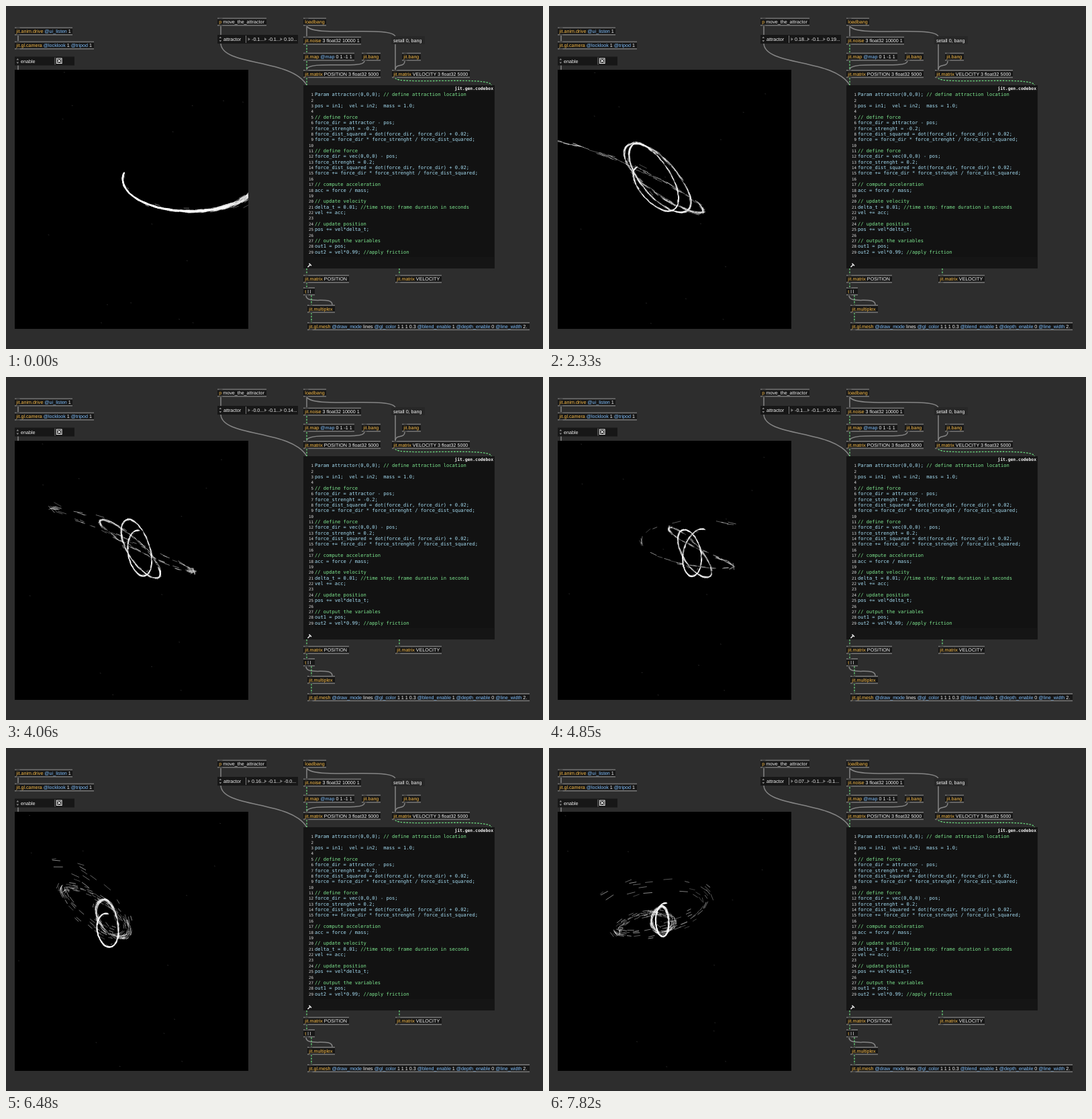
Animation, 800 px wide and 511 px high, one loop 7.85 s. Source, as an HTML page with a canvas:

```html
<!DOCTYPE html>
<html lang="en">
<head>
<meta charset="utf-8">
<title>Attractor patch</title>
<style>
html, body { margin: 0; width: 100%; height: 100%; overflow: hidden; background: #2d2d2d; }
svg, canvas { position: absolute; left: 0; top: 0; }
canvas { left: 13px; top: 95px; background: #000; }
text { white-space: pre; text-rendering: geometricPrecision; font: 7.15px "Liberation Sans", Arial, sans-serif; fill: #f4f4f4; }
.code, .num { font-family: "DejaVu Sans Mono", monospace; font-size: 7.09px; fill: #a6def4; }
.num { font-size: 5.8px; fill: #ddd; text-anchor: end; }
.head { font: bold 6.4px "DejaVu Sans Mono", monospace; text-anchor: end; }
.name { fill: #f8bb48; }
.attr { fill: #80c0ff; }
.note { fill: #7ee890; }
.cord, .wire { fill: none; stroke: #858585; stroke-width: 1.5; }
.wire { stroke: #69d67c; stroke-width: 1.3; stroke-dasharray: 2.6 1.8; }
</style>
</head>
<body>
<svg id="patch" width="800" height="511" viewBox="0 0 800 511"></svg>
<canvas id="view" width="348" height="386"></canvas>
<script>
const LOOP = 7850;
const patch = document.getElementById('patch');

function add(tag, attrs, text, parent = patch) {
  const el = document.createElementNS('http://www.w3.org/2000/svg', tag);
  for (const k in attrs) el.setAttribute(k, attrs[k]);
  if (text !== undefined) el.textContent = text;
  parent.appendChild(el);
  return el;
}
const rect = (x, y, width, height, fill) => add('rect', { x, y, width, height, fill });
const label = (x, y, text, cls = '') => add('text', { x, y, class: cls }, text);
const path = (d, cls) => add('path', { d, class: cls });
const span = (parent, text, cls) => add('tspan', { class: cls }, text, parent);

// First word is the object name, words with @ are attributes.
function box(x, y, w, text) {
  rect(x, y, w, 12, '#171717');
  for (const [dy, notch] of [[0, 0], [10.4, 11]]) {
    rect(x, y + dy, w, 1.8, '#707070');
    rect(x + 2.5, y + notch, 5, 1.2, '#3a3a3a');
  }
  const el = label(x + 2.3, y + 8.6, '');
  text.split(/(?= )/).forEach((word, i) => span(el, word, i === 0 ? 'name' : word[1] === '@' ? 'attr' : ''));
}

function attrui(x, y, w, name, split) {
  rect(x, y, w, 13, '#171717');
  add('path', { d: `M${x + 2.5} ${y + 5}l1.8 -2.4 1.8 2.4zM${x + 2.5} ${y + 8}l1.8 2.4 1.8 -2.4z`, fill: '#888' });
  label(x + 9, y + 9, name);
  rect(split, y + 1, 1, 11, '#777');
}

[
  'M18 44V53', 'M18 88V95', 'M320 29V43', 'M320 56C322 90 425 78 448 118',
  'M448 29V46', 'M448 29C452 48 578 28 580 46', 'M580 57V95',
  'M534 82C534 95 448 80 448 95', 'M594 82C594 92 580 85 580 95',
  'M447 431C447 446 486 431 486 445'
].forEach(d => path(d, 'cord'));
[
  'M448 58V70', 'M448 82V95', 'M448 107V118', 'M580 107C580 118 723 104 723 118',
  'M448 391V401', 'M586 391V401', 'M448 412V419', 'M455 431V445', 'M455 457V471'
].forEach(d => path(d, 'wire'));

box(13, 31.5, 86, 'jit.anim.drive @ui_listen 1');
box(13, 52.5, 118, 'jit.gl.camera @locklook 1 @tripod 1');
box(315, 17.5, 73, 'p move_the_attractor');
box(443, 17.5, 34, 'loadbang');
box(443, 45.5, 86, 'jit.noise 3 float32 10000 1');
box(443, 69.5, 76, 'jit.map @map 0 1 -1 1');
box(530, 69.5, 28, 'jit.bang');
box(590, 69.5, 28, 'jit.bang');
box(443, 95, 115, 'jit.matrix POSITION 3 float32 5000');
box(575, 95, 116, 'jit.matrix VELOCITY 3 float32 5000');
box(443, 400.5, 68, 'jit.matrix POSITION');
box(580, 400.5, 69, 'jit.matrix VELOCITY');
box(443, 419, 17, 't l l');
box(449, 445, 41, 'jit.multiplex');
box(449, 471, 331, 'jit.gl.mesh @draw_mode lines @gl_color 1 1 1 0.3 @blend_enable 1 @depth_enable 0 @line_width 2.');

rect(574, 45, 50, 12, '#272727');
label(577, 54, 'setall 0, bang');

attrui(13, 75.5, 89, 'enable', 72.5);
add('path', { d: 'M75.5 78h7.5v7.5h-7.5zM77 79.5l4.5 4.5M81.5 79.5l-4.5 4.5', fill: 'none', stroke: '#eee', 'stroke-width': 1.1 });
attrui(315, 43, 120, 'attractor', 357);
const readouts = [366, 390.5, 414].map(x => {
  add('path', { d: `M${x - 5.5} 47l3.5 2.5 -3.5 2.5z`, fill: '#777' });
  return label(x, 52, '');
});

rect(443, 118, 285, 273, '#151515');
rect(459, 127, 268, 247, '#121212');
label(726, 125, 'jit.gen.codebox', 'head');
add('path', { d: 'M449.5 389l4 -4M451.5 383.5l3.5 3.5', stroke: '#eee', 'stroke-width': 1.5 });
`Param attractor(0,0,0); // define attraction location

pos = in1;  vel = in2;  mass = 1.0;

// define force
force_dir = attractor - pos;
force_strenght = -0.2;
force_dist_squared = dot(force_dir, force_dir) + 0.02;
force = force_dir * force_strenght / force_dist_squared;

// define force
force_dir = vec(0,0,0) - pos;
force_strenght = 0.2;
force_dist_squared = dot(force_dir, force_dir) + 0.02;
force += force_dir * force_strenght / force_dist_squared;

// compute acceleration
acc = force / mass;

// update velocity
delta_t = 0.01; //time step: frame duration in seconds
vel += acc;

// update position
pos += vel*delta_t;

// output the variables
out1 = pos;
out2 = vel*0.99; //apply friction`.split('\n').forEach((line, i) => {
  const y = 134.3 + i * 8.37;
  const [, code, note] = line.match(/^(.*?)(\/\/.*)?$/);
  label(458, y, i + 1, 'num');
  const el = label(460, y, code, 'code');
  if (note) span(el, note, 'note');
});

// The strand winds through a chain of ellipses, one per turn, from the core outwards.
// An ellipse is given by both ends of its long axis and its half width; a negative width turns clockwise.
const poses = [
  { t: 0, x: -.13, z: .105, from: .97, to: 1.43, thin: 1, spread: 2.5, rings: [
    [174, 258, 376, 258, 48]] },
  { t: 1030, x: .045, z: .165, from: .15, to: 1.45, thin: .8, spread: 2, rings: [
    [122, 220, 238, 278, 22], [104, 196, 239, 262, 30], [104, 196, 540, 290, 60]] },
  { t: 2330, x: .185, z: .195, from: 0, to: 3, thin: 1.5, spread: 1.2, rings: [
    [131, 240, 185, 303, 22], [126, 206, 188, 303, 26], [121, 206, 222, 308, 22], [6, 201, 236, 306, 6]] },
  { t: 3330, x: -.02, z: .185, from: 0, to: 3, thin: 2, spread: 2.5, rings: [
    [167, 230, 196, 296, 18], [164, 198, 205, 296, 20], [108, 204, 228, 303, 10], [6, 152, 338, 292, 16]] },
  { t: 4850, x: -.13, z: .105, from: 0, to: 3.5, thin: 4.2, spread: 1.5, rings: [
    [232, 227, 204, 288, 15], [200, 228, 219, 305, 15], [180, 224, 258, 290, 6],
    [137, 243, 290, 275, -32], [137, 243, 450, 290, -95]] },
  { t: 6480, x: .165, z: -.03, from: 0, to: 3, thin: 3.4, spread: 16, rings: [
    [152, 247, 150, 297, 17], [147, 226, 160, 296, 13], [86, 208, 200, 264, 12], [40, 190, 150, 285, 55]] },
  { t: 7820, x: .075, z: -.12, from: 0, to: 3, thin: 3.4, spread: 16, rings: [
    [175, 231, 170, 271, 13], [168, 236, 166, 290, 9], [101, 272, 203, 240, 14], [70, 250, 270, 220, 45]] }
];

const mix = (a, b, f) => a + (b - a) * f;
const mixList = (a, b, f) => a.map((v, i) => mix(v, b[i], f));
const clamp = (v, lo, hi) => Math.min(hi, Math.max(lo, v));
const ringOf = (pose, i) => pose.rings[Math.min(i, pose.rings.length - 1)];

function strandPoint(rings, turn) {
  const i = Math.floor(turn);
  const [x0, y0, x1, y1, w] = mixList(rings[i], rings[i + 1], turn - i);
  const a = turn * 2 * Math.PI, cos = Math.cos(a);
  const hx = (x1 - x0) / 2, hy = (y1 - y0) / 2;
  const side = w * Math.sin(a) / Math.hypot(hx, hy);
  return [(x0 + x1) / 2 - hx * cos - hy * side, (y0 + y1) / 2 - hy * cos + hx * side];
}

let seed = 7;
function random() {
  seed = (seed * 16807) % 2147483647;
  return seed / 2147483647;
}
const particles = Array.from({ length: 1700 }, (_, i) => ({
  u: random(),
  off: (random() + random() + random() - 1.5) * 1.5 * (i % 40 ? 1 : 4),
  keep: random(),
  turn: (random() - .5) * .3,
  size: .6 + random() * .7,
  light: .25 + random() * .3
}));
const dust = Array.from({ length: 16 }, () => ({
  x: random() * 348, y: random() * 386, vx: random() * 16 - 8, vy: random() * 10 - 5
}));

const STEPS = 500;
const ctx = document.getElementById('view').getContext('2d');
ctx.strokeStyle = '#fff';

function dash(x, y, dx, dy, light) {
  ctx.globalAlpha = light;
  ctx.beginPath();
  ctx.moveTo(x - dx, y - dy);
  ctx.lineTo(x + dx, y + dy);
  ctx.stroke();
}

function draw(time) {
  let k = 0;
  while (k < poses.length - 2 && time >= poses[k + 1].t) k++;
  const a = poses[k], b = poses[k + 1];
  const f = clamp((time - a.t) / (b.t - a.t), 0, 1);
  const now = key => mix(a[key], b[key], f);

  [now('x'), -.15, now('z')].forEach((v, i) => {
    readouts[i].textContent = v.toFixed(4).slice(0, 4) + '...';
  });

  const from = now('from'), to = now('to'), thin = now('thin'), spread = now('spread');
  const rings = Array.from({ length: 6 }, (_, i) => mixList(ringOf(a, i), ringOf(b, i), f));
  const line = Array.from({ length: STEPS + 2 }, (_, i) => strandPoint(rings, mix(from, to, i / STEPS)));

  ctx.setTransform(1, 0, 0, 1, 0, 0);
  ctx.clearRect(0, 0, 348, 386);
  for (const d of dust) {
    dash(d.x + d.vx * time / 1000, d.y + d.vy * time / 1000, .8, .2, .16);
  }
  ctx.translate(-13, -95);
  for (const p of particles) {
    if (p.keep > Math.exp(-thin * p.u * p.u)) continue;
    const pos = p.u * STEPS, i = Math.floor(pos);
    const [x0, y0] = line[i], [x1, y1] = line[i + 1];
    const [x, y] = mixList(line[i], line[i + 1], pos - i);
    const angle = Math.atan2(y1 - y0, x1 - x0);
    const off = p.off * (.6 + spread * p.u ** 3);
    const dir = angle + p.turn * p.u;
    const half = (1.5 + 4 * p.u) * p.size;
    dash(x - Math.sin(angle) * off, y + Math.cos(angle) * off,
      Math.cos(dir) * half, Math.sin(dir) * half, p.light);
  }
}

function tick() {
  draw(performance.now() % LOOP);
  requestAnimationFrame(tick);
}
tick();
</script>
</body>
</html>
```
